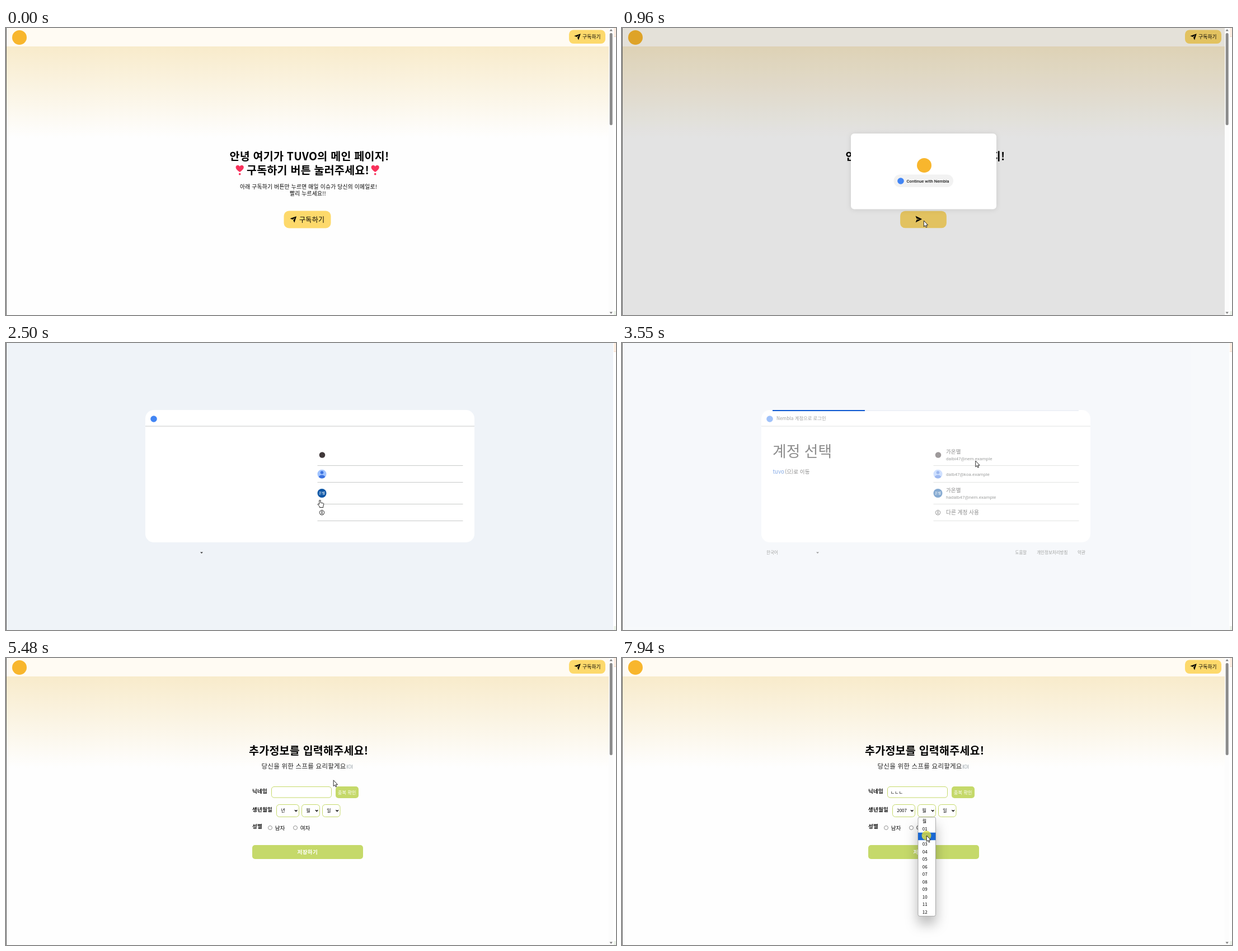
Animation, 1090 px wide and 514 px high, one loop 8 s. Source, as an HTML page:

```html
<!DOCTYPE html>
<html lang="ko">
<head>
<meta charset="utf-8">
<title>Sign-up walkthrough</title>
<style>
  html, body { margin: 0; width: 100%; height: 100%; overflow: hidden; background: #fff; }
  svg { position: absolute; left: 0; top: 0; }
  text { font-family: "Noto Sans CJK KR", "Noto Sans CJK JP", "Noto Sans", sans-serif; white-space: pre; }
  .latin { font-family: Roboto, Arial, sans-serif; }
  #track { position: absolute; left: 269px; top: 120px; width: 547px; height: 2px; overflow: hidden; background: #eef1f7; }
  .bar, .bar i { position: absolute; top: 0; width: 100%; height: 100%; }
  .bar i { left: 0; background: #0b57d0; }
</style>
</head>
<body>
<svg id="stage" width="1090" height="514" viewBox="0 0 1090 514">
  <defs>
    <linearGradient id="warm" x1="0" y1="0" x2="0" y2="1">
      <stop offset="0" stop-color="#f8ebcb"/><stop offset="1" stop-color="#fefefe"/>
    </linearGradient>
    <clipPath id="ctaClip"><rect x="496.5" y="327.5" width="84" height="31" rx="9"/></clipPath>
  </defs>
</svg>
<div id="track"></div>
<svg id="overlay" width="1090" height="514" viewBox="0 0 1090 514"></svg>
<script>
const LOOP = 8000, ROW = 13.55;
const LIME = '#c5d96a', GOLD = '#fdd96b', AMBER = '#f8b62d', BLUE = '#4285f4';
const $ = id => document.getElementById(id);

function el(parent, tag, attrs = {}) {
  const node = document.createElementNS('http://www.w3.org/2000/svg', tag);
  for (const k in attrs) node.setAttribute(k, attrs[k]);
  return parent.appendChild(node);
}
const group = (p, attrs) => el(p, 'g', attrs);
const box = (p, x, y, width, height, fill, rx = 0, more = {}) =>
  el(p, 'rect', { x, y, width, height, fill, rx, ...more });
const dot = (p, cx, cy, r, fill, more = {}) => el(p, 'circle', { cx, cy, r, fill, ...more });
const path = (p, d, more = {}) => el(p, 'path', { d, ...more });
const show = (node, on) => { node.style.display = on ? '' : 'none'; };

// y is the visual middle of the line
function text(p, x, y, str, size, { ls = 0, ...more } = {}) {
  const t = el(p, 'text', { x, y: y + size * 0.38, 'font-size': size, 'letter-spacing': ls, ...more });
  t.textContent = str;
  return t;
}

const plane = p => path(p, 'M2 9 22 2 15.5 22 12 14 18 6 10 12Z', { transform: 'scale(.58) translate(-12 -12)' });

function heart(p, x, y) {
  const g = group(p, { transform: `translate(${x} ${y}) scale(.95)`, fill: '#f8315b' });
  path(g, 'M0 12.5C-3 10.5-7.5 7.5-7.5 3.8C-7.5-1-1.8-1.3 0 2C1.8-1.3 7.5-1 7.5 3.8C7.5 7.5 3 10.5 0 12.5Z');
  dot(g, 0, 16.5, 1.9, '#f8315b');
}

const stage = $('stage');
const bold = { 'font-weight': 700 };
const heading = { ls: 0.25, ...bold };

// shared page frame
const site = group(stage);
box(site, 0, 0, 1077, 514, '#fefefe');
box(site, 0, 33, 1077, 164, 'url(#warm)');
box(site, 0, 0, 1077, 33, '#fffbf3');
dot(site, 24, 17, 13, AMBER);
box(site, 1006, 3.5, 65, 24.5, GOLD, 8);
plane(group(site, { transform: 'translate(1021 16)' }));
text(site, 1030, 16, '구독하기', 8.7, { ls: 0.2 });

// landing page
const home = group(site);
text(home, 399.5, 230, '안녕 여기가 TUVO의 메인 페이지!', 19.5, heading);
text(home, 430, 254.5, '구독하기 버튼 눌러주세요!', 19.5, heading);
heart(home, 417.7, 246);
heart(home, 659.7, 246);
text(home, 418, 284, '아래 구독하기 버튼만 누르면 매일 이슈가 당신의 이메일로!', 9.8, { ls: 0.2 });
text(home, 507, 296, '빨리 누르세요!!', 9.8, { ls: 0.2 });
const cta = group(home);
box(cta, 496.5, 327.5, 84, 31, GOLD, 9);
const ctaInner = group(cta, { 'clip-path': 'url(#ctaClip)' });
const ctaIcon = group(ctaInner);
plane(ctaIcon);
const ctaText = text(ctaInner, 524, 343, '구독하기', 12, { ls: 0.3 });

// sign-in dialog
const dialog = group(stage);
box(dialog, 0, 0, 1077, 514, '#000', 0, { opacity: 0.105 });
box(dialog, 409, 189, 260, 135.5, '#fff', 6, { style: 'filter:drop-shadow(0 1px 5px rgba(0,0,0,.1))' });
dot(dialog, 540, 246, 13, AMBER);
box(dialog, 485.5, 262.5, 106.5, 22.5, '#f2f2f2', 11.2);
dot(dialog, 498, 274, 5.8, BLUE);
text(dialog, 508.5, 273.7, 'Continue with Nembla', 7.7, { class: 'latin', 'font-weight': 500, fill: '#1f1f1f' });

// sign-up form
const form = group(stage);
text(form, 434, 166, '추가정보를 입력해주세요!', 19.5, heading);
text(form, 456.5, 194, '당신을 위한 스프를 요리할게요', 11.5, { ls: 0.25, fill: '#222' });
dot(form, 614, 194.5, 3.3, '#eef0f1', { stroke: '#b4bbc0', 'stroke-width': 0.9 });
path(form, 'M609.5 191V198.5M618.7 191V198.5', { stroke: '#a9b0b5', 'stroke-width': 1 });
[['닉네임', 238], ['생년월일', 271.5], ['성별', 301.5]].forEach(([s, y]) =>
  text(form, 440, y, s, 9.6, { ls: 0.2, ...bold, fill: '#111' }));
const field = box(form, 474.5, 230.5, 107, 19.5, '#fff', 4.5);
const typed = text(form, 480, 240.5, '', 8);
const compose = path(form, '', { stroke: '#000', 'stroke-width': 0.8, fill: 'none' });
box(form, 589, 230, 41, 21, LIME, 5);
text(form, 593, 240.5, '중복 확인', 8, { ls: 0.2, fill: '#fff', 'font-weight': 500 });
const [year] = [[483.5, 40, '년'], [528.5, 32, '월'], [565.5, 31.5, '일']].map(([x, w, s]) => {
  box(form, x, 262.5, w, 22, '#fff', 5, { stroke: LIME });
  path(form, `M${x + w - 7.5} 272.3l2.2 2.2 2.2-2.2`, { fill: 'none', stroke: '#000', 'stroke-width': 1.4 });
  return text(form, x + 7.7, 273, s, 8);
});
[[472, '남자'], [517, '여자']].forEach(([x, s]) => {
  dot(form, x, 304, 3.5, '#fff', { stroke: '#767676', 'stroke-width': 0.8 });
  text(form, x + 8.8, 304, s, 9.6);
});
box(form, 440, 335, 198, 25, LIME, 5);
text(form, 520.5, 347.5, '저장하기', 9.6, { ls: 0.3, ...bold, fill: '#fff' });

function menu(x, y, width, items) {
  const g = group(form), h = items.length * ROW + 1.2;
  box(g, x, y, width, h, '#fff', 3, {
    stroke: '#8a8a8a', 'stroke-width': 0.7, style: 'filter:drop-shadow(0 14px 11px rgba(0,0,0,.28))'
  });
  const mark = box(g, x, y, width, ROW, '#1967d2');
  const rows = items.map((s, i) => text(g, x + 7.7, y + 0.6 + (i + 0.5) * ROW, s, 8));
  return (on, cy) => {
    show(g, on);
    const k = Math.floor((cy - y - 0.6) / ROW);
    const pick = k >= 0 && k < items.length ? k : 0;
    mark.setAttribute('y', y + 0.6 + pick * ROW);
    rows.forEach((r, i) => r.setAttribute('fill', i === pick ? '#fff' : '#000'));
  };
}
const years = ['년', ...Array.from({ length: 19 }, (_, i) => `${2024 - i}`)];
const months = ['월', ...Array.from({ length: 12 }, (_, i) => `${i + 1}`.padStart(2, '0'))];
const yearMenu = menu(483.5, 262 - 20 * ROW - 1.2, 40.5, years);
const monthMenu = menu(529, 285, 31.5, months);

// scrollbar
const scroll = group(stage);
box(scroll, 1077, 0, 8, 514, '#fcfcfc');
box(scroll, 1078.7, 9, 5, 165, '#8b8b8b', 2.5);
path(scroll, 'M1078.5 5.5L1081.2 2 1083.9 5.5ZM1078.5 508.5L1081.2 512 1083.9 508.5Z', { fill: '#7d7d7d' });

// account chooser
const account = group(stage);
box(account, 0, 0, 1085, 514, '#fff');
const sheet = group(account);
box(sheet, 0, 0, 1085, 514, '#eff3f8');
box(sheet, 249, 120, 588, 237, '#fff', 15);
const rule = (x, y, w) => box(sheet, x, y, w, 1, '#c8cac9');
rule(249, 148.5, 588);
[219, 249, 288, 318].forEach(y => rule(556.5, y, 260));
dot(sheet, 264, 136, 5.8, BLUE);
dot(sheet, 565, 200.5, 5.3, '#40383a');
dot(sheet, 564.5, 234.7, 8, '#a0c3ff');
dot(sheet, 564.5, 232, 2.8, '#3d73e0');
path(sheet, 'M559 240.2C559 235.3 570 235.3 570 240.2A8 8 0 0 1 559 240.2Z', { fill: '#3d73e0' });
dot(sheet, 564.5, 269, 8, '#0b55a5');
text(sheet, 558.8, 269, '온별', 6.2, { fill: '#fff' });
const outline = { stroke: '#333', 'stroke-width': 1 };
dot(sheet, 564.5, 303.7, 4.3, 'none', outline);
dot(sheet, 564.5, 302.5, 1.4, 'none', outline);
path(sheet, 'M561.5 306.5Q564.5 304 567.5 306.5', { fill: 'none', ...outline });
path(sheet, 'M347 374.5h5l-2.5 2.5Z', { fill: '#333' });

const words = group(sheet, { fill: '#1f1f1f' });
const grey = { fill: '#444746' };
text(words, 276, 135, 'Nembla 계정으로 로그인', 8.3, grey);
text(words, 269, 194, '계정 선택', 26.8);
text(words, 269.5, 230, 'tuvo', 9.6, { fill: '#0b57d0', 'font-weight': 500 });
text(words, 291, 230, '(으)로 이동', 9.6);
text(words, 579, 194, '가온별', 9.6);
text(words, 579, 263, '가온별', 9.6);
text(words, 579, 303, '다른 계정 사용', 9.7);
[['dalbi47@nem.example', 206.7], ['dalb47@koa.example', 234.5], ['hadalb47@nem.example', 275.7]].forEach(([s, y]) =>
  text(words, 579, y, s, 8.1, { class: 'latin', ...grey }));
[['한국어', 258], ['도움말', 702.5], ['개인정보처리방침', 741.2], ['약관', 814]].forEach(([s, x]) =>
  text(words, x, 375, s, 7.5, grey));

// window edges
box(stage, 0, 0, 1, 514, '#5a5a5a');
box(stage, 1085, 0, 5, 514, '#fff');
box(stage, 1086, 0, 4, 15, '#fdeee2');
box(stage, 1086, 15, 4, 1, '#f3d9c8');
box(stage, 1086, 507, 4, 7, '#edf3ea');

// pointer
const overlay = $('overlay');
const ring = dot(overlay, 0, 0, 8.5, '#dcdc3c', { opacity: 0.8 });
const pointer = group(overlay, { fill: '#fff', stroke: '#111', 'stroke-width': 0.9, 'stroke-linejoin': 'round' });
const arrow = path(pointer, 'M.3 0V10.8L2.7 8.6 4.3 12.2 6 11.4 4.4 8H7.7Z');
const hand = path(pointer, 'M-1.2 8V1Q0-.6 1.2 1V5L6 6Q7 6.3 6.8 7.5L5.8 11.5V13.5H-.6V12L-3.8 8.2Q-3.6 6.5-2.2 7.2Z');

// indeterminate progress: two sliding bars, each step is [offset, value, easing]
const bz = (...a) => `cubic-bezier(${a})`;
const BARS = [
  { left: -145.166611,
    slide: [[0, 0], [.2, 0, bz(.5, 0, .701732, .495819)], [.5915, 83.67142, bz(.302435, .381352, .55, .956352)], [1, 200.611057]],
    grow: [[0, .08], [.3665, .08, bz(.334731, .12482, .785844, 1)], [.6915, .661479, bz(.06, .11, .6, 1)], [1, .08]] },
  { left: -54.888891,
    slide: [[0, 0, bz(.15, 0, .515058, .409685)], [.25, 37.651913, bz(.31033, .284058, .8, .733712)],
            [.4835, 84.386165, bz(.4, .627035, .6, .902026)], [1, 160.277782]],
    grow: [[0, .08, bz(.205028, .057051, .57661, .453971)], [.1915, .457104, bz(.152313, .196432, .648374, 1.004315)],
           [.4415, .72796, bz(.257759, -.003163, .211762, 1.38179)], [1, .08]] }
];
const PERIOD = 2413;
function sweep(node, steps, toTransform) {
  const frames = steps.map(([offset, v, easing = 'linear']) => ({ offset, easing, transform: toTransform(v) }));
  const a = node.animate(frames, { duration: PERIOD, fill: 'both' });
  a.pause();
  return a;
}
const barAnims = BARS.flatMap(({ left, slide, grow }) => {
  const bar = document.createElement('div'), inner = document.createElement('i');
  bar.className = 'bar';
  bar.style.left = left + '%';
  bar.append(inner);
  $('track').append(bar);
  return [sweep(bar, slide, v => `translateX(${v}%)`), sweep(inner, grow, v => `scaleX(${v})`)];
});

// timeline
const MOVES = [
  [70, 1084, 494], [330, 770, 350], [520, 610, 303], [720, 539, 345], [960, 539, 345],
  [1600, 561, 281], [2580, 561, 281], [3000, 622, 206], [3550, 631.5, 211], [4200, 638, 214],
  [4940, 595, 213], [5400, 590, 217], [5850, 530, 238], [6400, 530, 238], [6570, 503, 269],
  [6720, 503, 269], [7040, 505, 243], [7160, 505, 243], [7420, 546, 270], [7600, 546, 272], [7880, 544, 318]
];
const CLICKS = [[760, 880], [1640, 1780], [3050, 3190], [5850, 5950], [6620, 6700], [7090, 7200], [7450, 7530], [7890, 8000]];
const KEYS = [6050, 6250, 6400];

const within = (t, a, b) => t >= a && t < b;
const ramp = (t, a, b) => {
  const u = Math.min(1, Math.max(0, (t - a) / (b - a)));
  return u * u * (3 - 2 * u);
};
function pointerAt(t) {
  const i = MOVES.findIndex(m => m[0] > t);
  if (i < 0) return MOVES[MOVES.length - 1].slice(1);
  if (i === 0) return MOVES[0].slice(1);
  const [ta, xa, ya] = MOVES[i - 1], [tb, xb, yb] = MOVES[i];
  const u = tb < 700 ? (t - ta) / (tb - ta) : ramp(t, ta, tb);
  return [xa + (xb - xa) * u, ya + (yb - ya) * u];
}

function draw(t) {
  const [x, y] = pointerAt(t);
  const choosing = within(t, 2500, 5350), waiting = within(t, 3200, 5350);
  show(home, t < 2500);
  show(dialog, within(t, 900, 2500));
  show(account, choosing);
  show(form, t >= 5350);
  show(words, t >= 2560);
  sheet.setAttribute('opacity', waiting ? 0.5 : 1);

  const hover = ramp(t, 620, 840) - ramp(t, 970, 1240);
  const press = within(t, 890, 1030) ? 0.985 : 1;
  const bob = hover * Math.sin(t / 190) * 0.8;
  cta.setAttribute('transform', `translate(538.5 343) scale(${press}) translate(-538.5 -343)`);
  ctaIcon.setAttribute('transform',
    `translate(${513.3 + 14 * hover} ${343 + bob}) rotate(${45 * hover}) scale(${1 + 0.08 * hover})`);
  ctaText.setAttribute('transform', `translate(${60 * hover} 0)`);

  show($('track'), waiting);
  const p = Math.min(PERIOD, Math.max(0, t - 3210));
  barAnims.forEach(a => { a.currentTime = p; });

  const focused = within(t, 5880, 6680);
  field.setAttribute('stroke', focused ? '#000' : LIME);
  field.setAttribute('stroke-width', focused ? 1.7 : 1);
  const n = KEYS.filter(k => t >= k).length;
  typed.textContent = 'ㄴ'.repeat(n);
  const end = 480 + n * 7.36;
  const underline = n ? `M${end - 7.3} 245H${end}` : '';
  compose.setAttribute('d', focused ? `${underline}M${end + 0.5} 236V245.5` : '');
  year.textContent = t >= 7200 ? '2007' : '년';
  yearMenu(within(t, 6700, 7200), y);
  monthMenu(t >= 7520, y);

  show(pointer, t >= 70);
  pointer.setAttribute('transform', `translate(${x} ${y})`);
  const pointing = within(t, 1540, 3200);
  show(hand, pointing);
  show(arrow, !pointing);
  show(ring, CLICKS.some(([a, b]) => within(t, a, b)));
  ring.setAttribute('cx', x);
  ring.setAttribute('cy', y);
}

const start = performance.now();
function tick() {
  draw((performance.now() - start) % LOOP);
  requestAnimationFrame(tick);
}
tick();
</script>
</body>
</html>
```
